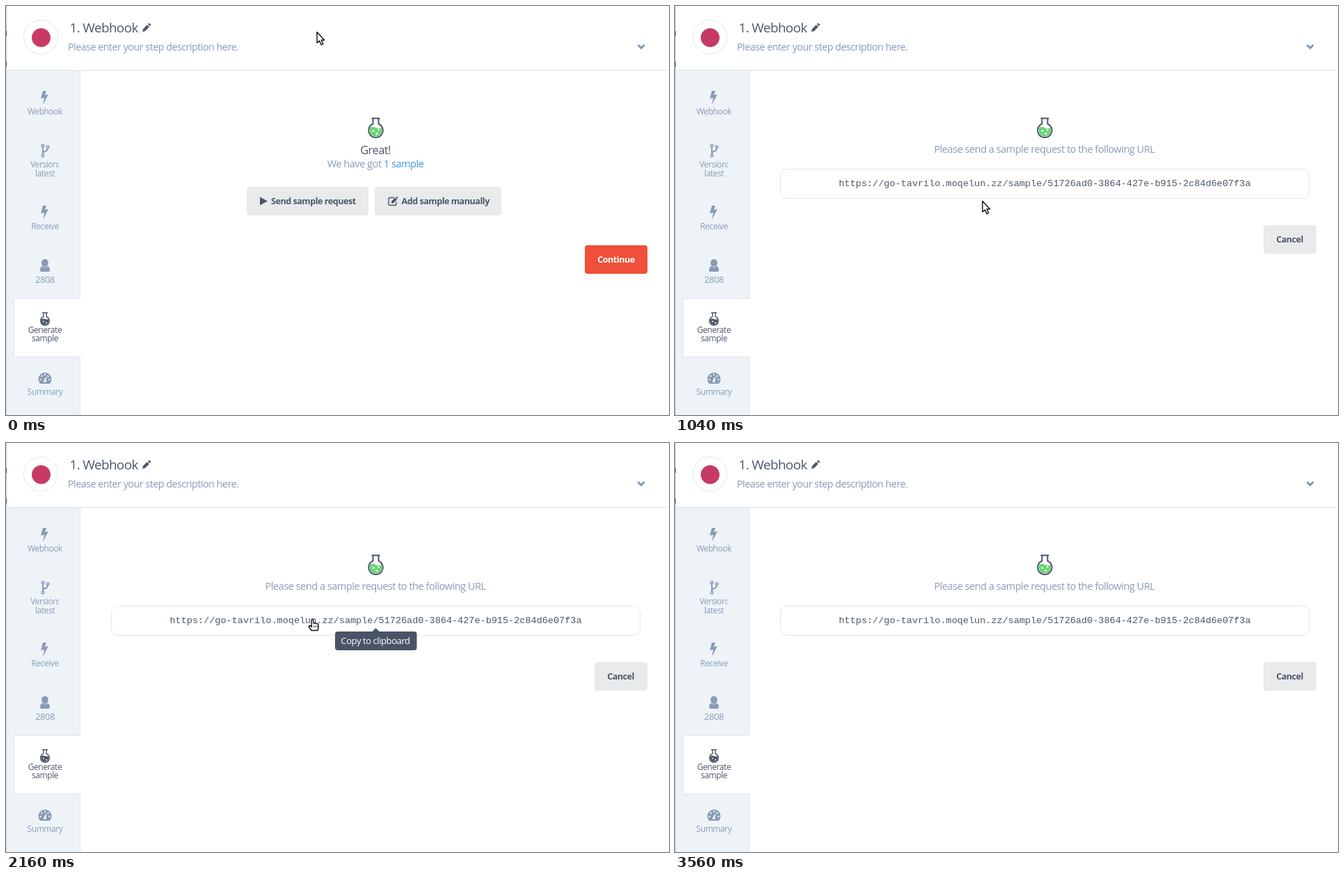
These frames come from a looping animation (953x588 px, 8 s). An HTML page:

```html
<!DOCTYPE html>
<html lang="en">
<head>
<meta charset="utf-8">
<title>Generate sample</title>
<style>
  html, body { margin: 0; width: 100%; height: 100%; overflow: hidden; background: #fff; }
  svg { display: block; width: 953px; height: 588px; }
  text { font: 14.6px "Open Sans", "Noto Sans", sans-serif; letter-spacing: -.035em; fill: #8a9bb6; }
  .mid { text-anchor: middle; }
  .dark { fill: #4d576a; }
  .title { font-size: 19px; }
  .hint { font-size: 14.3px; }
  .great { font-size: 16.5px; }
  .side text { font-size: 12px; text-anchor: middle; }
  .side .number { font-size: 13px; }
  .bold { font-size: 12.5px; font-weight: 700; fill: #4d576a; }
  .tip { fill: #4a5467; }
  .tip text { font-size: 13.1px; fill: #fff; text-anchor: middle; }
  .url { font: 13.53px "Liberation Mono", monospace; letter-spacing: 0; }
  .icon { fill: #8a9bb6; }
  .line { fill: none; stroke: #4d576a; stroke-width: 2; }
  .thin { stroke-width: 1.4; }
  .grey { fill: #e9eaec; }
</style>
</head>
<body>
<svg viewBox="0 0 953 588">
  <defs>
    <path id="bolt" d="M-3-10h5L0-4l5-1-8 15 2-10-5 1z"/>
    <path id="tipPoint" d="M526.5 271l5-5 5 5z"/>
  </defs>

  <!-- Header -->
  <path d="M.5 0v588" stroke="#c3cad3"/>
  <path d="M0 36h1v7H0zM0 80h1v7H0z" fill="#404a5c"/>
  <path d="M1 92.5h952" stroke="#dde5ed"/>
  <circle cx="50" cy="44.500" r="24.500" fill="#fff" stroke="#e3e7ec"/>
  <circle cx="50.500" cy="45.500" r="13.500" fill="#c73a63"/>
  <text class="dark title" x="91.500" y="38">1. Webhook</text>
  <path class="dark" d="M196 37l1-4 6-6 3 3-6 6zM204 26l1-1q1-.5 2 .5l1 1q.5 1-.2 1.700l-.8.800z"/>
  <text class="hint" x="89" y="64">Please enter your step description here.</text>
  <path d="M908.5 56l4.500 4.500 4.500-4.500" fill="none" stroke="#8297b4" stroke-width="3"/>

  <!-- Sidebar -->
  <path d="M1 93h106v495H1z" fill="#eef3f8"/>
  <path d="M106.500 93v495" stroke="#dce5ee"/>
  <path d="M107 420.500H13.500q-2 0-2 2v80q0 2 2 2H107" fill="#fff" stroke="#dfe6ee"/>
  <path d="M106 421h2v83h-2z" fill="#fff"/>
  <g class="side">
    <use href="#bolt" class="icon" x="56" y="132"/>
    <text x="56" y="156">Webhook</text>
    <g fill="none" stroke="#8a9bb6" stroke-width="1.500">
      <circle cx="53" cy="200.500" r="1.800"/><circle cx="53" cy="215" r="1.800"/><circle cx="60" cy="202.500" r="1.800"/>
      <path d="M53 202.500v10.500M60 204.500q0 3.500-4 4.500-3 1-3 3" stroke-width="2"/>
    </g>
    <text x="56" y="232">Version:</text>
    <text x="56" y="245">latest</text>
    <use href="#bolt" class="icon" x="56" y="297"/>
    <text x="56" y="321">Receive</text>
    <path class="icon" d="M56 364c7 0 6 11 0 11s-7-11 0-11zM52 374q4 3.500 8 0 3 1 3 6 0 2-2 2H51q-2 0-2-2 0-5 3-6z"/>
    <text class="number" x="56" y="398">2808</text>
    <path class="line thin" d="M52 441h8M54 441v5.500a6.500 6.500 0 1 0 4 0V441"/>
    <path class="dark" d="M50.500 450q3-1 5.500 0t5.500 0c2 11-13 11-11 0z"/>
    <circle cx="54" cy="453.500" r="1" fill="#fff"/><circle cx="58" cy="455.500" r="1" fill="#fff"/>
    <text class="dark" x="56" y="470">Generate</text>
    <text class="dark" x="56" y="482">sample</text>
    <path class="icon" d="M49 543q-2.500-2.500-2.500-6.500a9.500 9.500 0 0 1 19 0q0 4-2.500 6.500z"/>
    <g fill="#eef3f8">
      <circle cx="49.500" cy="537" r="1.200"/><circle cx="51.500" cy="532" r="1.200"/><circle cx="56" cy="530" r="1.200"/>
      <circle cx="60.500" cy="532" r="1.200"/><circle cx="62.500" cy="537" r="1.200"/>
      <path d="M57.500 533l1 .3-1 4.700q1.500 3-1.500 3t-1.500-3z"/>
    </g>
    <text x="56" y="559">Summary</text>
  </g>

  <!-- Flask shared by both views -->
  <path d="M523.500 175q4-2.500 8 0t8 0a8.800 8.800 0 1 1-16 0z" fill="#69d673"/>
  <path class="line" d="M525.500 161.500h12M527.500 161v8.500a10.200 10.200 0 1 0 8 0V161"/>
  <g fill="#fff"><circle cx="528" cy="179.500" r="1.500"/><circle cx="535.500" cy="178.500" r="1.200"/><circle cx="533" cy="183.500" r="1.500"/></g>

  <g id="choice">
    <text class="mid dark great" x="531" y="213">Great!</text>
    <text class="mid" x="531" y="232">We have got <tspan fill="#3f98e8">1 sample</tspan></text>
    <rect id="send" x="346" y="260" width="175" height="41" rx="4"/>
    <path class="dark" d="M365 274.500l11 6-11 6z"/>
    <text class="bold" x="381" y="285">Send sample request</text>
    <rect class="grey" x="530" y="260" width="182" height="41" rx="4"/>
    <path class="line thin" d="M558 275.500h-6q-2 0-2 2v7q0 2 2 2h7q2 0 2-2v-3"/>
    <path class="dark" d="M554 283.500v-2.800l5.500-5.500 2.800 2.800-5.500 5.500zM560.300 274.500l1-1 2.500 2.500-1 1z"/>
    <text class="bold" x="568.500" y="285">Add sample manually</text>
    <rect x="832" y="344" width="90" height="41" rx="4" fill="#ef5039"/>
    <text class="bold mid" x="877" y="369" style="fill:#fff">Continue</text>
  </g>

  <g id="request">
    <text class="mid" x="531" y="211">Please send a sample request to the following URL</text>
    <rect x="151.500" y="234.500" width="760" height="42" rx="9" fill="#fff" stroke="#e4e7eb"/>
    <text class="mid dark url" x="531.500" y="259">https://go-tavrilo.moqelun.zz/sample/51726ad0-3864-427e-b915-2c84d6e07f3a</text>
    <rect class="grey" x="846" y="315" width="76" height="41" rx="4"/>
    <text class="bold mid" x="883.500" y="340">Cancel</text>
    <g id="copyTip" class="tip">
      <use href="#tipPoint"/>
      <rect x="473" y="271" width="117.500" height="27" rx="4"/>
      <text x="531" y="289">Copy to clipboard</text>
    </g>
    <g id="copiedTip" class="tip">
      <use href="#tipPoint"/>
      <rect x="502.500" y="271" width="57.500" height="27" rx="4"/>
      <text x="531" y="289">Copied</text>
    </g>
  </g>

  <g id="cursor" fill="#fff" stroke="#111" stroke-width="1.400" stroke-linejoin="round">
    <path id="arrow" d="M0 .5v15.500l3.500-3 2.600 5.800 2.600-1.200-2.500-5.600h4.500z"/>
    <g id="hand">
      <path d="M-.8 9V1.500q0-1.500 1.300-1.500t1.300 1.500V5.500q1.500-.8 2.400.3 1.500-.6 2.300.5 2.500-.3 2.500 2v3.200l-1 4.500H-1l-3.500-5q-.7-1.700.8-2 1.500 0 2.900 2z"/>
      <path d="M2 9v2.500M4.500 9v2.500M7 9v2.500" stroke-width=".9"/>
    </g>
  </g>
</svg>
<script>
const LOOP = 8000, STEP = 40;
const el = id => document.getElementById(id);
const show = (id, on) => el(id).style.display = on ? '' : 'none';

// Value of the last [time, value] pair already reached.
const held = (keys, t) => keys.reduce((value, [time, next]) => t >= time ? next : value, 0);

const copyOpacity = [[2040, .5], [2160, 1], [2800, .5], [2960, 0]];
const copiedOpacity = [[1880, .22], [2040, 0], [2960, 1], [3360, .4], [3560, 0]];
const laterStops = [[0, [442, 280]], [1360, [442, 269]], [1440, [441, 260]], [1600, [440, 253.5]], [2640, [420, 328]]];

function pointerAt(t) {
  if (t >= 600) return held(laterStops, t);
  const p = t / 600, u = p * p * (3 - 2 * p);
  const bend = (a, b, c) => (1 - u) ** 2 * a + 2 * u * (1 - u) * b + u * u * c;
  return [bend(447, 409, 442), bend(37, 150, 280)];
}

function draw(now) {
  const t = Math.floor(now % LOOP / STEP) * STEP;
  const [x, y] = pointerAt(t);
  const choosing = t < 1040;
  const overSend = choosing && y >= 260;
  const pointing = overSend || (t >= 1600 && t < 2640);
  show('choice', choosing);
  show('request', !choosing);
  show('cursor', t < 2800);
  show('hand', pointing);
  show('arrow', !pointing);
  el('send').setAttribute('fill', overSend ? '#dbdde0' : '#e9eaec');
  el('cursor').setAttribute('transform', `translate(${x} ${y})`);
  el('copyTip').style.opacity = held(copyOpacity, t);
  el('copiedTip').style.opacity = held(copiedOpacity, t);
}

const start = performance.now();
function tick() {
  draw(performance.now() - start);
  requestAnimationFrame(tick);
}
tick();
</script>
</body>
</html>
```
